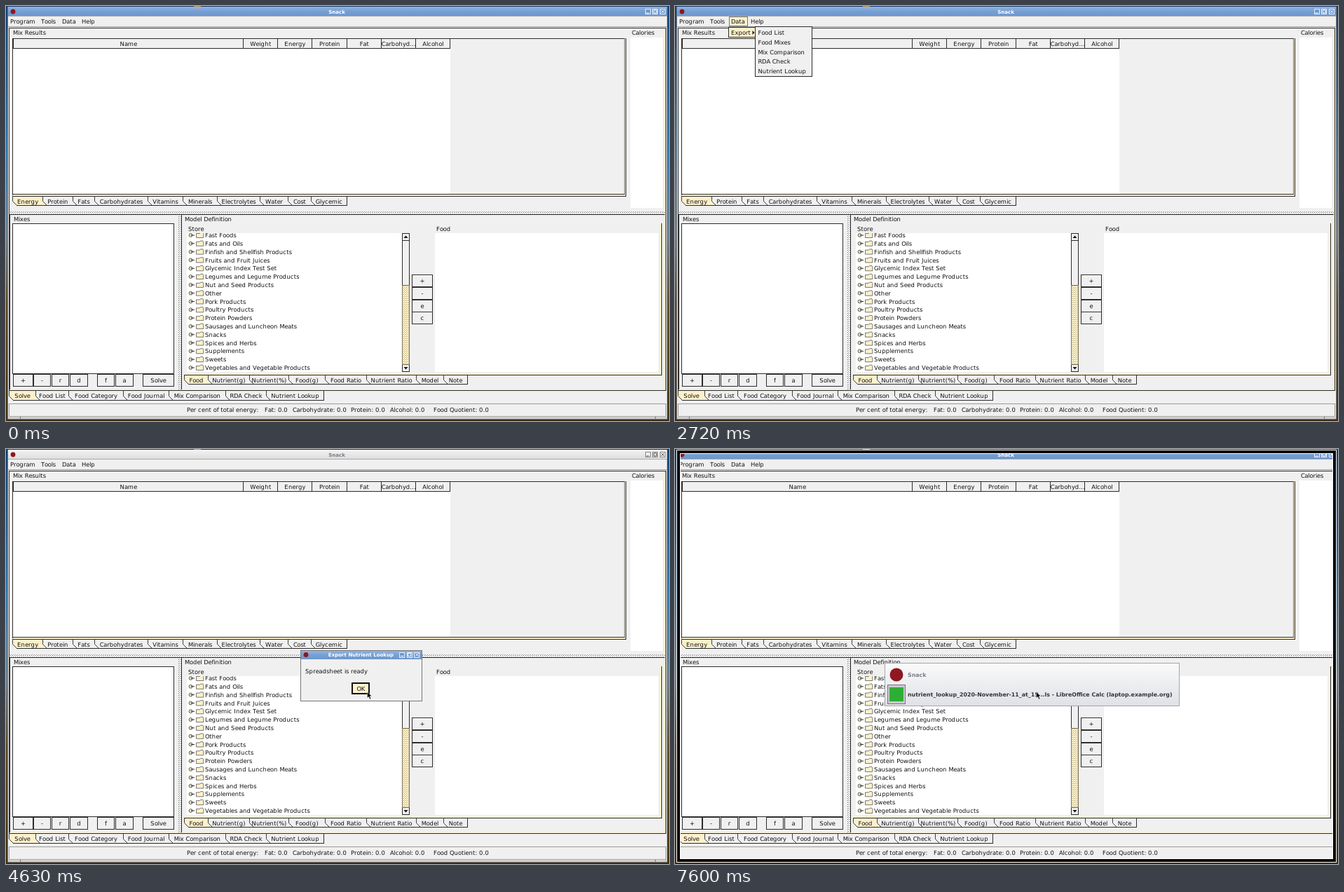
An HTML page that plays this animation: 946x592 px, repeating every 8 s.

```html
<!DOCTYPE html>
<html lang="en">
<head>
<meta charset="utf-8">
<title>Nutrient export</title>
<style>
html, body { margin: 0; width: 946px; height: 592px; overflow: hidden; }
svg { display: block; font: 8.4px "DejaVu Sans", sans-serif; text-rendering: geometricPrecision; }
rect, line { shape-rendering: crispEdges; }
text { white-space: pre; }
</style>
</head>
<body>
<svg id="stage" width="946" height="592" viewBox="0 0 946 592" xmlns="http://www.w3.org/2000/svg"></svg>
<script>
const BG = '#f0f0f0', CREAM = '#fdf1cc', INK = '#111', EDGE = '#2c2c2c', GRAY = '#9a9a9a';
const LOOP = 8000;

// The interface is set in a 12px font on whole-pixel advances, shown at 70%.
const SCALE = .7;
const ruler = document.createElement('canvas').getContext('2d');
ruler.font = '12px "DejaVu Sans", sans-serif';
const advance = c => Math.round(ruler.measureText(c).width) * SCALE;

const attrs = o => Object.entries(o).map(([k, v]) => `${k}="${v}"`).join(' ');
const fill = (x, y, w, h, color, extra = {}) =>
  `<rect x="${x}" y="${y}" width="${w}" height="${h}" fill="${color}" ${attrs(extra)}/>`;
const box = (x, y, w, h, color = BG, stroke = EDGE) =>
  fill(x + .5, y + .5, w - 1, h - 1, color, { stroke });
const line = (x1, y1, x2, y2, color = EDGE) =>
  x1 === x2 ? fill(x1, y1, 1, y2 - y1, color) : fill(x1, y1, x2 - x1, 1, color);
const group = (id, body) => `<g id="${id}">${body}</g>`;

const textWidth = s => [...s].reduce((w, c) => w + advance(c), 0);
function text(x, mid, s) {
  const xs = [];
  for (const c of s) { xs.push(x.toFixed(1)); x += advance(c); }
  return `<text x="${xs.join(' ')}" y="${mid + 3.1}" fill="${INK}">${s}</text>`;
}
const centred = (x, mid, s) => text(x - textWidth(s) / 2, mid, s);
const boldText = (x, mid, s, color, size, anchor = 'start') =>
  `<text x="${x}" y="${mid + 2.8}" fill="${color}" font-size="${size}" font-weight="bold" ` +
  `text-anchor="${anchor}">${s}</text>`;

const button = (x, y, w, h, label) =>
  box(x, y, w, h) + line(x + 1, y + 1, x + w - 1, y + 1, '#fff') + centred(x + w / 2, y + h / 2, label);

// Tabs hang below a pane; each has a cut lower left corner.
function tabs(left, top, height, rights, labels) {
  const end = rights[rights.length - 1], bottom = top + height - 1;
  const shapes = labels.map((label, i) => {
    const x = i ? rights[i - 1] : left, r = rights[i];
    const face = i ? '' : `<path d="M${x} ${top}v${height - 6}l6 6H${r + 6}l-6 -6V${top}z" fill="${CREAM}"/>`;
    return face + `<path d="M${x + .5} ${top}v${height - 6.5}l6 6" fill="none" stroke="${EDGE}" stroke-width=".9"/>` +
      centred((x + r) / 2 + .5, top + height / 2 + .3, label);
  });
  return shapes.join('') + line(left + 6, bottom, end + 1, bottom) + line(end, top, end, bottom + 1) +
    line(rights[0], top - 1, end, top - 1);
}

function titleButtons(x, y, stroke, face) {
  const glyphs = ['M-2 2h4', 'M-2 -2h4v4h-4z', 'M-2 -2l4 4M2 -2l-4 4'];
  return glyphs.map((d, i) =>
    `<g transform="translate(${x + i * 10.7} ${y})">` +
    `<rect x="-3.5" y="-3.5" width="7" height="7" fill="${face}" stroke="${stroke}"/>` +
    `<path d="${d}" fill="none" stroke="${face === BG ? '#555' : '#fff'}"/></g>`).join('');
}

const titleText = (x, y, s, color) => boldText(x, y - .3, s, color, 7.05, 'middle');
const badge = (x, y, r) => `<circle cx="${x}" cy="${y}" r="${r}" fill="#8e1720"/>`;

const defs = `<defs>
  <linearGradient id="desk" x2="0" y2="1">
    <stop stop-color="#123e70"/><stop offset=".35" stop-color="#2f78b0"/>
    <stop offset=".55" stop-color="#6b8290"/><stop offset=".72" stop-color="#5d4826"/>
    <stop offset="1" stop-color="#42300f"/></linearGradient>
  <linearGradient id="active" x2="0" y2="1">
    <stop stop-color="#91b5e2"/><stop offset=".5" stop-color="#769fd3"/>
    <stop offset="1" stop-color="#6d97cc"/></linearGradient>
  <linearGradient id="idle" x2="0" y2="1">
    <stop stop-color="#f3f3f3"/><stop offset="1" stop-color="#dedede"/></linearGradient>
  <linearGradient id="panel" x2="0" y2="1">
    <stop stop-color="#fafafa"/><stop offset="1" stop-color="#dfe1e6"/></linearGradient>
  <pattern id="dots" width="3" height="3" patternUnits="userSpaceOnUse">
    <rect width="3" height="3" fill="#f4f4f4"/><rect width="1" height="1" fill="#777"/>
    <rect x="1" y="2" width="1" height="1" fill="#999"/></pattern>
  <pattern id="thumb" width="3" height="3" patternUnits="userSpaceOnUse">
    <rect width="3" height="3" fill="${CREAM}"/><rect width="1" height="1" fill="#a79a70"/>
    <rect x="1" y="2" width="1" height="1" fill="#c6b887"/></pattern>
  <clipPath id="treeClip"><rect x="260" y="324" width="305" height="198"/></clipPath>
</defs>`;

function windowFrame() {
  return fill(0, 0, 946, 592, 'url(#desk)') + fill(0, 0, 946, 1, '#17375f') +
    fill(268, 0, 10, 1, '#c88b45') + fill(0, 590, 946, 2, '#3c2c15') +
    fill(2, 1, 942, 589, '#e6e6e6') + fill(3, 14, 940, 574, BG) +
    line(2, 1, 2, 590, '#777') + line(943, 1, 943, 590, '#777') + line(2, 589, 944, 589, '#666') +
    group('titleOn', fill(3, 1, 940, 13, 'url(#active)') + titleText(472, 8, 'Snack', '#fff') +
      titleButtons(915.5, 8, '#e7eefa', '#6f98ce')) +
    group('titleOff', fill(3, 1, 940, 13, 'url(#idle)') + titleText(472, 8, 'Snack', '#777b85') +
      titleButtons(915.5, 8, '#888', BG)) +
    badge(10, 8, 3.4) + line(3, 14, 943, 14, '#aaa');
}

function menuBar() {
  return group('dataHot', box(77, 15, 27, 14, CREAM, '#777')) +
    [[6, 'Program'], [50, 'Tools'], [80, 'Data'], [108, 'Help']]
      .map(([x, s]) => text(x, 22, s)).join('') + line(3, 29, 943, 29, GRAY);
}

function results() {
  const edges = [10, 338, 387, 436, 486, 535, 584, 633];
  const heads = ['Name', 'Weight', 'Energy', 'Protein', 'Fat', 'Carbohyd...', 'Alcohol'];
  return text(10, 38, 'Mix Results') +
    box(9, 46, 875, 224) + fill(10, 60, 624, 208, '#fff') +
    line(882, 47, 882, 268, '#777') + fill(883, 46, 2, 225, CREAM) +
    line(884, 46, 884, 272) + fill(10, 269, 874, 2, CREAM) + line(10, 268, 883, 268) +
    line(9, 271, 885, 271) +
    heads.map((s, i) => box(edges[i], 46, edges[i + 1] - edges[i] + 1, 15) +
      centred((edges[i] + edges[i + 1]) / 2 + .8, 53.5, s)).join('') +
    tabs(9, 272, 13, [52, 95, 126, 202, 252, 301, 362, 402, 435, 486],
      ['Energy', 'Protein', 'Fats', 'Carbohydrates', 'Vitamins', 'Minerals', 'Electrolytes',
        'Water', 'Cost', 'Glycemic']) +
    text(893, 38, 'Calories') + fill(891, 45, 46, 243, '#fff');
}

function mixes() {
  const keys = [[10, 29, '+'], [39, 25, '-'], [65, 25, 'r'], [91, 26, 'd'],
    [130, 25, 'f'], [156, 26, 'a'], [195, 45, 'Solve']];
  return text(11, 303.5, 'Mixes') + box(9, 310, 231, 215, '#fff') +
    keys.map(([x, w, s]) => button(x, 525, w, 18, s)).join('');
}

function treeRow(label, i) {
  const y = 327 + i * 11.81;
  return `<g transform="translate(0 ${y})">` +
    `<circle cx="263.5" cy="0" r="2.4" fill="${CREAM}" stroke="${EDGE}" stroke-width=".8"/>` +
    `<path d="M263.5 0h5.5" stroke="${EDGE}" stroke-width="1"/>` +
    `<path d="M271.5 3.5v-6h5l1-1.2h3.5l.8 1.2v6z" fill="${CREAM}" stroke="#555" stroke-width=".8"/>` +
    `</g>` + text(284, y, label);
}

function model() {
  const foods = ['Fast Foods', 'Fats and Oils', 'Finfish and Shellfish Products',
    'Fruits and Fruit Juices', 'Glycemic Index Test Set', 'Legumes and Legume Products',
    'Nut and Seed Products', 'Other', 'Pork Products', 'Poultry Products', 'Protein Powders',
    'Sausages and Luncheon Meats', 'Snacks', 'Spices and Herbs', 'Supplements', 'Sweets',
    'Vegetables and Vegetable Products'];
  return text(255, 303.5, 'Model Definition') + text(260, 317.5, 'Store') + text(614, 317.5, 'Food') +
    fill(258, 324, 308, 198, '#fff') + fill(612, 324, 319, 198, '#fff') +
    `<g clip-path="url(#treeClip)">${foods.map(treeRow).join('')}</g>` +
    box(565, 324, 11, 198) + box(565, 324, 11, 11) + box(565, 511, 11, 11) +
    box(565, 398, 11, 114, 'url(#thumb)', '#776d50') +
    `<path d="M567.5 331h6l-3 -3.5zM567.5 515h6l-3 3.5z" fill="${INK}"/>` +
    ['+', '-', 'e', 'c'].map((s, i) => button(579, Math.round(383 + i * 17.8), 30, 18, s)).join('') +
    fill(933, 310, 2, 217, CREAM) + line(935, 310, 935, 527) +
    fill(254, 524, 680, 2, CREAM) + line(254, 526, 936, 526) +
    tabs(254, 527, 13, [288, 347, 403, 455, 514, 585, 624, 658],
      ['Food', 'Nutrient(g)', 'Nutrient(%)', 'Food(g)', 'Food Ratio', 'Nutrient Ratio', 'Model', 'Note']);
}

function mainPane() {
  const status = [[258, 'Per cent of total energy:'], [369, 'Fat: 0.0'], [409, 'Carbohydrate: 0.0'],
    [492, 'Protein: 0.0'], [548, 'Alcohol: 0.0'], [610, 'Food Quotient: 0.0']];
  return line(4, 31, 942, 31) + line(4, 31, 4, 549) + fill(939, 32, 2, 516, CREAM) +
    line(941, 31, 941, 549) +
    fill(5, 293, 935, 4, 'url(#dots)') + line(5, 297, 940, 297) + line(5, 297, 5, 547) +
    fill(246, 298, 4, 249, 'url(#dots)') + line(250, 297, 250, 547) +
    fill(5, 547, 935, 1, CREAM) + line(4, 548, 942, 548) +
    results() + mixes() + model() +
    tabs(4, 549, 14, [42, 89, 167, 232, 313, 371, 453],
      ['Solve', 'Food List', 'Food Category', 'Food Journal', 'Mix Comparison', 'RDA Check', 'Nutrient Lookup']) +
    box(4, 567, 938, 19, BG, GRAY) + status.map(([x, s]) => text(x, 576, s)).join('') +
    line(3, 587, 943, 587, '#aaa') + line(20, 586, 20, 590, '#777') + line(926, 586, 926, 590, '#777');
}

const exportItems = ['Food List', 'Food Mixes', 'Mix Comparison', 'RDA Check', 'Nutrient Lookup'];
const itemY = i => 38 + i * 13.75;

function menus() {
  return group('dataMenu', box(76, 30, 42, 15) + group('exportHot', fill(77, 31, 40, 13, CREAM)) +
      text(80, 38, 'Export') + `<path d="M110.5 35v6l3 -3z" fill="${INK}"/>`) +
    group('subMenu', box(114, 29, 82, 72) + fill(115, 31, 80, 13, CREAM, { id: 'itemHot' }) +
      exportItems.map((s, i) => text(118.5, itemY(i), s)).join(''));
}

function dialog() {
  return group('dialog', box(420, 287, 174, 73, BG, '#777') + fill(421, 288, 172, 12, 'url(#active)') +
    badge(428, 293.5, 3.4) + titleText(506.5, 293.5, 'Export Nutrient Lookup', '#fff') +
    titleButtons(565, 293.5, '#e7eefa', '#6f98ce') + text(427, 317, 'Spreadsheet is ready') +
    fill(494, 334, 24, 15, BG, { id: 'ok', stroke: INK, 'stroke-width': 2 }) + centred(506.3, 341.8, 'OK'));
}

function switcher() {
  const outline = fill(5, 4, 936, 583, 'none', { stroke: '#000', 'stroke-width': 6 }) +
    fill(2.5, 1.5, 941, 588, 'none', { stroke: '#fff' }) +
    fill(7.5, 6.5, 931, 578, 'none', { stroke: '#fff' });
  return group('outline', outline) +
    group('switcher', box(299, 305, 421, 62, 'url(#panel)', '#a4a6ab') +
      badge(316, 322, 9.5) + boldText(332, 322, 'Snack', '#7c7f8b', 7.87) +
      box(303, 336, 26, 28, '#c9cbd0', '#777') + fill(306, 340, 20, 20, '#2fae35') +
      boldText(332, 349.7, 'nutrient_lookup_2020-November-11_at_15...ls - LibreOffice Calc (laptop.example.org)',
        '#33353b', 7.87));
}

const pointer = group('pointer',
  `<path d="M.4 .3v9l2.1 -1.9 1.6 3.6 1.7 -.8 -1.6 -3.4h2.9z" fill="#000" stroke="#fff" stroke-width=".6"/>`);

const stage = document.getElementById('stage');
stage.innerHTML = defs + windowFrame() + menuBar() + mainPane() + menus() + dialog() + switcher() + pointer;

const el = id => document.getElementById(id);
const show = (id, on) => el(id).setAttribute('visibility', on ? 'inherit' : 'hidden');

// Start time and highlighted submenu entry; -1 clears the highlight.
const hovers = [[1900, 0], [2070, -1], [2110, 1], [2720, -1], [2760, 2],
  [2820, -1], [2860, 3], [2930, -1], [2970, 4]];

function render(t) {
  const within = (a, b) => t >= a && t < b;
  show('dataHot', within(500, 3680));
  show('dataMenu', within(540, 3680));
  show('exportHot', within(980, 3680));
  show('subMenu', within(1180, 3680));
  const hover = hovers.reduce((cur, [at, item]) => t >= at ? item : cur, -1);
  show('itemHot', hover >= 0 && within(1180, 3680));
  el('itemHot').setAttribute('y', Math.round(itemY(Math.max(hover, 0)) - 7));

  const idle = within(3740, 5650);
  show('titleOn', !idle);
  show('titleOff', idle);
  show('dialog', within(3740, 5590));
  el('ok').setAttribute('fill', t >= 4630 ? CREAM : BG);

  show('pointer', t >= 4180);
  const step = Math.min(7, Math.max(0, Math.floor((t - 4180) / 40))) / 7;
  const ease = 1 - (1 - step) ** 2;
  el('pointer').setAttribute('transform',
    `translate(${Math.round(426 + 89 * ease)} ${Math.round(286 + 60 * ease)})`);

  show('outline', t >= 7540);
  show('switcher', t >= 7600);
}

const start = performance.now();
function tick() {
  render((performance.now() - start) % LOOP);
  requestAnimationFrame(tick);
}
tick();
</script>
</body>
</html>
```
